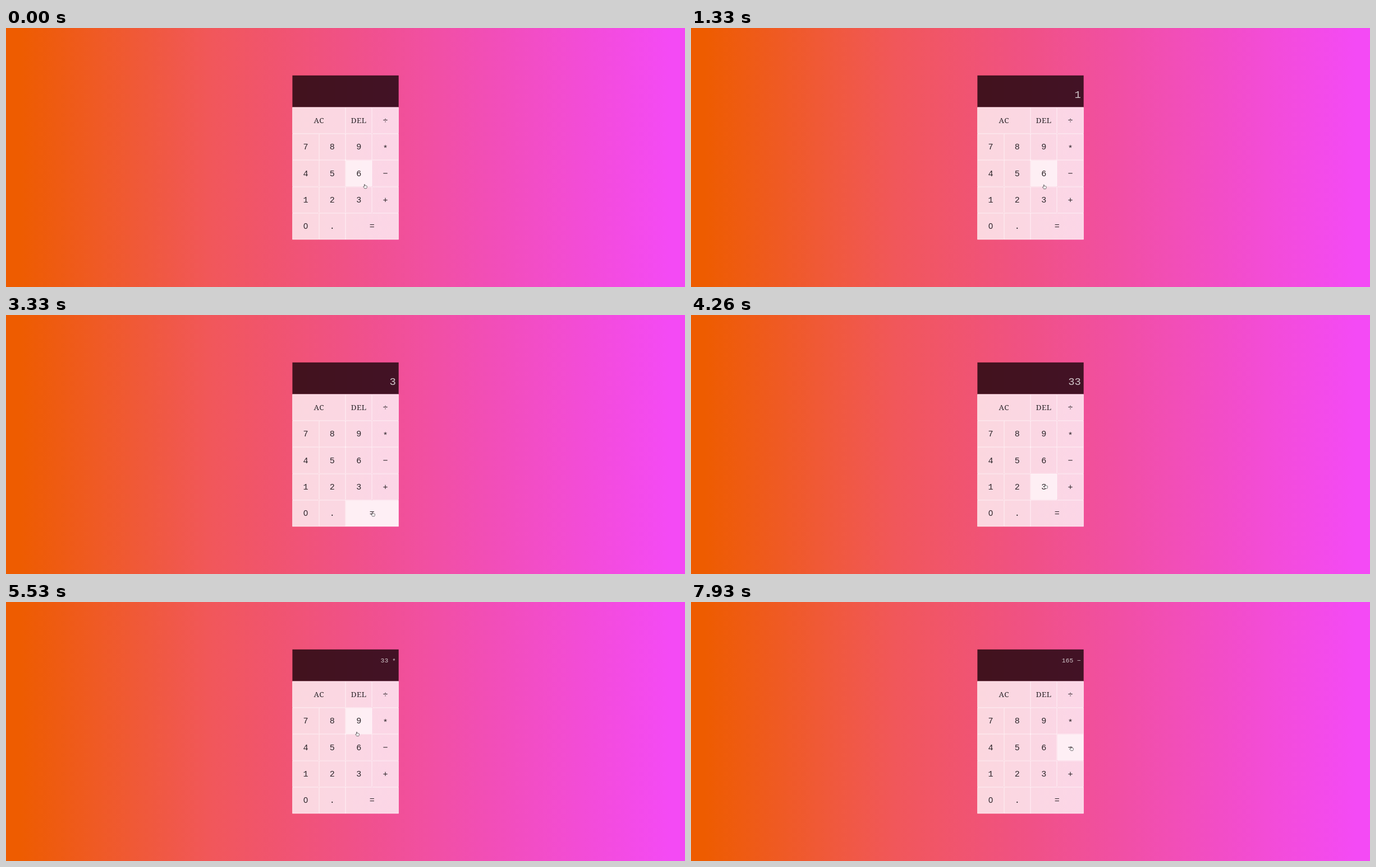
Recreate the animation shown at these times as an HTML page. Size 1210 by 463 pixels, loop 8000 ms.

```html
<!DOCTYPE html>
<html lang="en">
<head>
<meta charset="utf-8">
<title>Calculator</title>
<style>
  html, body { margin: 0; width: 100%; height: 100%; overflow: hidden; }
  svg { display: block; width: 100%; height: 100%; }
  text { font-family: "Liberation Mono", monospace; }
  .key { fill: #fff; stroke: #fff; stroke-width: .7; }
  .label { font-size: 15.1px; text-anchor: middle; fill: #2c2529; }
  .word { font-family: "Noto Serif", serif; font-size: 13.4px; letter-spacing: .4px; }
  .zero { font-family: "Liberation Sans", sans-serif; font-size: 14.5px; }
  .out { text-anchor: end; fill: #fff; fill-opacity: .76; }
</style>
</head>
<body>
<svg viewBox="0 0 1210 463" preserveAspectRatio="none">
  <defs>
    <linearGradient id="bg">
      <stop offset=".02" stop-color="#ee5c00"/>
      <stop offset=".3" stop-color="#f1575a"/>
      <stop offset=".5" stop-color="#f05186"/>
      <stop offset=".98" stop-color="#f44af5"/>
    </linearGradient>
  </defs>
  <rect width="1210" height="463" fill="url(#bg)"/>
  <rect x="510.4" y="84.8" width="189.3" height="56.8" fill="#110006" fill-opacity=".78"/>
  <g id="keys"></g>
  <text id="upper" class="out" x="694.9" font-size="11.36"></text>
  <text id="lower" class="out" x="694.9" font-size="18.9"></text>
  <path id="hand" fill="#fff" stroke="#2b2529" stroke-width=".65" stroke-linejoin="round"
    d="M-1.6 .5V-3.2q.6-.9 1.2 0V-1q.7-.6 1.2 .1q.7-.5 1.2 .2q.9-.4 1.3 .4V1.3Q3.2 2.8 2.4 3.8H-1.2Q-2 2.4-3.4 .9Q-3.3-.2-1.6 .5z"/>
</svg>
<script>
const LOOP = 8000, TRAVEL = 340;
const CELL = 47.33, LEFT = 510.35, TOP = 141.6;
const ROWS = ["AC AC DEL ÷", "7 8 9 *", "4 5 6 −", "1 2 3 +", "0 . = ="];
const START = { x: 640, y: 283 };

// Each step: the key, when the hand sets off for it, when it is pressed
const STEPS = [
  { key: "1", go: 60, press: 560 },
  { key: "+", go: 1124, press: 1760 },
  { key: "2", go: 1980, press: 2400 },
  { key: "=", go: 2440, press: 2930 },
  { key: "3", go: 3310, press: 4130 },
  { key: "*", go: 4225, press: 5000 },
  { key: "5", go: 5350, press: 5830 },
  { key: "=", go: 5900, press: 6450 },
  { key: "−", go: 6540, press: 7190 }
];

const OPS = {
  "+": (a, b) => a + b,
  "−": (a, b) => a - b,
  "*": (a, b) => a * b,
  "÷": (a, b) => a / b
};

const get = id => document.getElementById(id);
const hand = get("hand"), upper = get("upper"), lower = get("lower");

function add(tag, attrs) {
  const el = document.createElementNS("http://www.w3.org/2000/svg", tag);
  for (const name in attrs) el.setAttribute(name, attrs[name]);
  return get("keys").appendChild(el);
}

function makeKey(label, col, row, span) {
  const x = LEFT + col * CELL, y = TOP + row * CELL, w = span * CELL;
  const rect = add("rect", {
    class: "key", x: x + .35, y: y + .35, width: w - .7, height: CELL - .7
  });
  const kind = label.length > 1 ? " word" : label === "0" ? " zero" : "";
  const drop = label === "*" ? 7 : 4.8;
  add("text", { class: "label" + kind, x: x + w / 2, y: y + CELL / 2 + drop }).textContent = label;
  return { label, rect, x, y, w };
}

const keys = [];
ROWS.forEach((line, row) => {
  const labels = line.split(" ");
  labels.forEach((label, col) => {
    if (label === labels[col - 1]) return;
    keys.push(makeKey(label, col, row, label === labels[col + 1] ? 2 : 1));
  });
});

function restingPoint(label) {
  const k = keys.find(key => key.label === label);
  return { x: k.x + k.w / 2 + 2, y: k.y + CELL / 2 + 2 };
}

// Long sideways moves rise in an arc; steep ones run straight
function glide(from, to, p) {
  const e = p * p * (3 - 2 * p);
  const dx = to.x - from.x, dy = to.y - from.y;
  const lift = .2 * Math.max(0, Math.abs(dx) - 1.5 * Math.abs(dy));
  return { x: from.x + dx * e, y: from.y + dy * e - 4 * e * (1 - e) * lift };
}

function pointerAt(t) {
  return STEPS.filter(s => s.go <= t).reduce(
    (from, s) => glide(from, restingPoint(s.key), Math.min(1, (t - s.go) / TRAVEL)),
    START
  );
}

function pressKey({ prev, op, cur }, key) {
  if (OPS[key]) return { prev: cur, op: key, cur: "" };
  if (key === "=") return { prev: "", op: "", cur: String(OPS[op](+prev, +cur)) };
  return { prev, op, cur: cur + key };
}

function showDisplay(t) {
  const { prev, op, cur } = STEPS.filter(s => s.press <= t)
    .reduce((state, s) => pressKey(state, s.key), { prev: "", op: "", cur: "" });
  const sign = op === "*" ? '<tspan dy="1.6">*</tspan>' : op;
  const both = prev && cur;
  upper.innerHTML = op && `${prev} ${sign}`;
  upper.setAttribute("y", both ? 102.6 : 107.6);
  lower.textContent = cur;
  lower.setAttribute("y", both ? 128.4 : 125.2);
}

function render(t) {
  const { x, y } = pointerAt(t);
  const tipX = x - 1, tipY = y - 3.5;
  hand.setAttribute("transform", `translate(${x} ${y})`);
  for (const k of keys) {
    const over = tipX >= k.x && tipX < k.x + k.w && tipY >= k.y && tipY < k.y + CELL;
    k.rect.setAttribute("fill-opacity", over ? .91 : .77);
  }
  showDisplay(t);
}

const begin = performance.now();
function tick() {
  render((performance.now() - begin) % LOOP);
  requestAnimationFrame(tick);
}
tick();
</script>
</body>
</html>
```
